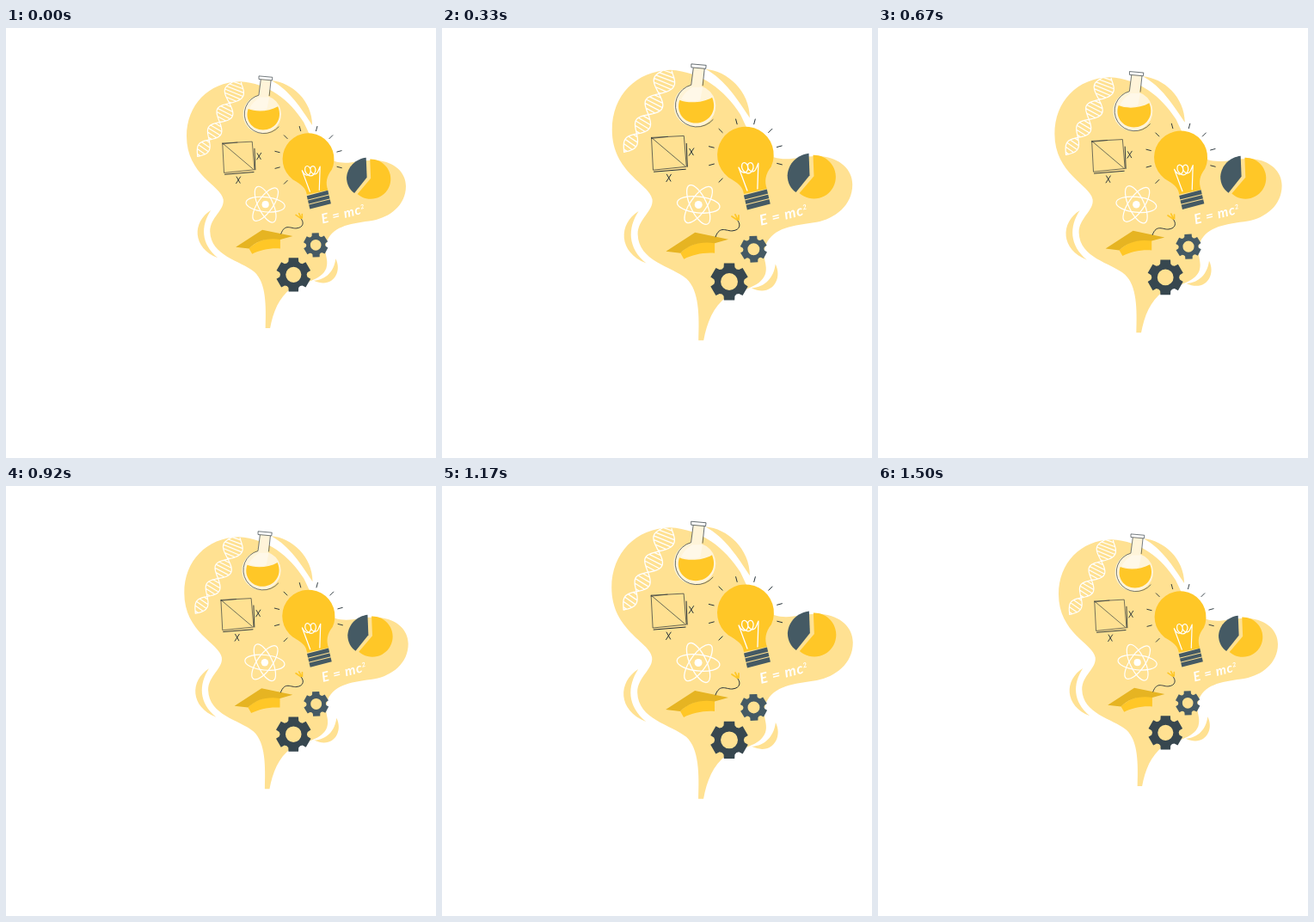
Recreate the animation shown at these times as an HTML page. Size 500 by 500 pixels, loop 1.54 s.

```html
<!DOCTYPE html>
<html lang="en">
<head>
<meta charset="utf-8">
<title>Ideas</title>
<style>
html, body { margin: 0; height: 100%; overflow: hidden; background: #fff; }
svg { display: block; width: 100vw; height: 100vh; }
.pale { fill: #ffe192; }
.gold { fill: #ffc727; }
.dark { fill: #455a64; }
.ink, .chalk { fill: none; stroke-linecap: round; stroke-linejoin: round; }
.ink { stroke: #263238; stroke-width: 1; }
.fine { stroke-width: .7; }
.chalk { stroke: #fff; stroke-width: 1.3; }
text { font: italic 700 17px Lato, "Open Sans", sans-serif; fill: #fff; }
</style>
</head>
<body>
<svg viewBox="0 0 500 500">
<g id="cloud">
  <g class="pale">
    <path d="M298 364C299 335 299 306 284 292C266 277 228 272 227 240C227 222 246 213 244 199C241 181 197 168 197 118C197 78 225 49 265 48C302 50 329 72 347 100C360 127 367 146 386 150C405 156 420 147 442 149C463 151 478 164 478 182C478 207 457 222 436 226C409 230 386 232 377 252C371 268 380 275 376 287C370 303 346 305 331 313C315 325 308 343 304 364Z"/>
    <path d="M228 213C204 228 204 261 237 274C215 256 215 233 228 213Z"/>
    <path d="M306 47C332 49 358 73 358 104C344 83 329 59 306 47Z"/>
    <path d="M388 275C397 293 383 314 360 303C376 302 386 291 388 275Z"/>
  </g>

  <path id="dna" class="chalk"/>

  <g id="flask">
    <path fill="#fff4d9" d="M292 45L305 46L302 67A24.500 24.500 0 1 1 289 66Z"/>
    <path class="gold" d="M276 83C285 87 302 87 314 80C321 97 309 110 295 110C281 110 271 97 276 83Z"/>
    <path fill="#fff" opacity=".4" d="M291 68C285 72 280 77 278 82C286 85 294 85 300 83L303 68Z"/>
    <path class="ink fine" d="M290 41L307 42.500L306.500 46.500L290 45ZM292 46L289.500 65.500A25 25 0 1 0 315 106M305 47L303 66"/>
  </g>

  <path class="ink fine" d="M243 127L281 125L284 161L245 165L243 127L282 160M243 128L262 126"/>
  <path class="ink" d="M284 134L285 161M246 167L283 164"/>
  <path class="ink" d="M287.500 140L292 147.500M292.500 139.500L287 148M261 170L265.500 178M266 170L260.500 178.500"/>

  <g class="chalk" transform="translate(298 205.500)">
    <ellipse rx="25" ry="9.500" transform="rotate(6)"/>
    <ellipse rx="25" ry="9.500" transform="rotate(65)"/>
    <ellipse rx="25" ry="9.500" transform="rotate(125)"/>
    <circle r="4.500" fill="#fff" stroke="none"/>
  </g>

  <path class="gold" d="M277 262C289 250 304 248 317 249L317 262C304 261 291 264 281 269Z"/>
  <path fill="#e6b422" d="M260 260L294 238L333 246L317 250.500C301 248 287 252 277 262Z"/>
  <path class="ink" d="M318 243C323 229 331 237 338 236C347 235 348 228 343 223"/>
  <path class="ink" style="stroke:#ffc727;stroke-width:1.800" d="M343 223L337 219M344 223L341 217M345 223L345 218"/>

  <path class="gold" d="M351 193C350 184 344 180 333 173.500A33 33 0 1 1 383 161C376 170 375 178 378 187Z"/>
  <path class="dark" d="M351 194.500L378 187.500L382 204.500L355 211.500Z"/>
  <path class="chalk" style="stroke:#ffe192;stroke-width:1.100" d="M352 200L380 193M353 205.500L381 198.500"/>
  <path class="chalk" d="M355 189L345 162C348 168 352 170 355 166C358 160 352 153 349 158C347 165 355 172 360 167C365 160 360 153 356 158C354 165 362 170 365 164L368 157L367 187"/>
  <path id="rays" class="ink"/>

  <path class="dark" d="M428 171L427 145.500C414 147 403 157 402 171C402 180 406 187 412 191Z"/>
  <path class="gold" d="M432 147.500A25.500 25.500 0 1 1 416 192L433 172Z"/>

  <text transform="translate(371 230) rotate(-14)" letter-spacing=".8">E = mc<tspan dy="-6" font-size="8">2</tspan></text>

  <path id="bigGear" fill="#37474f" fill-rule="evenodd"/>
  <path id="smallGear" class="dark" fill-rule="evenodd"/>
</g>
</svg>
<script>
const $ = id => document.getElementById(id);
const line = points => 'M' + points.map(p => p.map(n => n.toFixed(2))).join('L');
const polar = (x, y, r, deg) => [x + r * Math.cos(deg * Math.PI / 180), y + r * Math.sin(deg * Math.PI / 180)];

function gear(x, y, r, hole, tilt) {
  const rim = [];
  for (let tooth = 0; tooth < 6; tooth++) {
    const a = tooth * 60 + 30 + tilt;
    rim.push(polar(x, y, r * .8, a - 21), polar(x, y, r, a - 16), polar(x, y, r, a + 16),
      polar(x, y, r * .8, a + 21), polar(x, y, r * .75, a + 30));
  }
  return `${line(rim)}ZM${x - hole} ${y}a${hole} ${hole} 0 1 0 ${2 * hole} 0a${hole} ${hole} 0 1 0 ${-2 * hole} 0Z`;
}

// Two mirrored waves along a gently bent, tapering axis, joined by rungs.
function helix() {
  const point = (u, side) => {
    const v = 1 - u;
    const x = v * v * 263 + 2 * u * v * 247 + u * u * 211;
    const y = v * v * 48 + 2 * u * v * 95 + u * u * 144;
    const dx = -32 * v - 72 * u, dy = 94 * v + 98 * u, len = Math.hypot(dx, dy);
    const w = side * (13.5 - 6.5 * u) * Math.sin(Math.PI * (.1 + 3.9 * Math.pow(u, 1.2)));
    return [x - dy / len * w, y + dx / len * w];
  };
  const steps = Array.from({ length: 61 }, (_, i) => i / 60);
  const rungs = Array.from({ length: 23 }, (_, i) => (i + .5) / 23);
  return [1, -1].map(side => line(steps.map(u => point(u, side)))).join('') +
    rungs.map(u => line([point(u, 1), point(u, -1)])).join('');
}

$('dna').setAttribute('d', helix());
$('bigGear').setAttribute('d', gear(334, 295.5, 22.5, 10, 0));
$('smallGear').setAttribute('d', gear(362.5, 257.5, 16, 7, -2));
$('rays').setAttribute('d', [135, 165, 194, 225, 255, 285, 315, 345, 14]
  .map(a => line([polar(353, 148, 38, a), polar(353, 148, 44, a)])).join(''));

const LOOP = 1540, FRAME = LOOP / 37, DRAWN_SCALE = 1.102;
const BEATS = [[0, 1], [300, 1.102], [857, 1.002], [1160, 1.102], [1498, 1], [LOOP, 1]];

function scaleAt(t) {
  const i = BEATS.findIndex(([end]) => end > t);
  const [t0, s0] = BEATS[i - 1], [t1, s1] = BEATS[i];
  return s0 + (s1 - s0) * (t - t0) / (t1 - t0);
}

function draw() {
  const t = performance.now() % LOOP;
  const held = Math.min(36, Math.floor((t + 4) / FRAME)) * FRAME;
  $('cloud').setAttribute('transform',
    `translate(337.5 202) scale(${scaleAt(held) / DRAWN_SCALE}) translate(-337.5 -202)`);
  requestAnimationFrame(draw);
}
draw();
</script>
</body>
</html>
```
